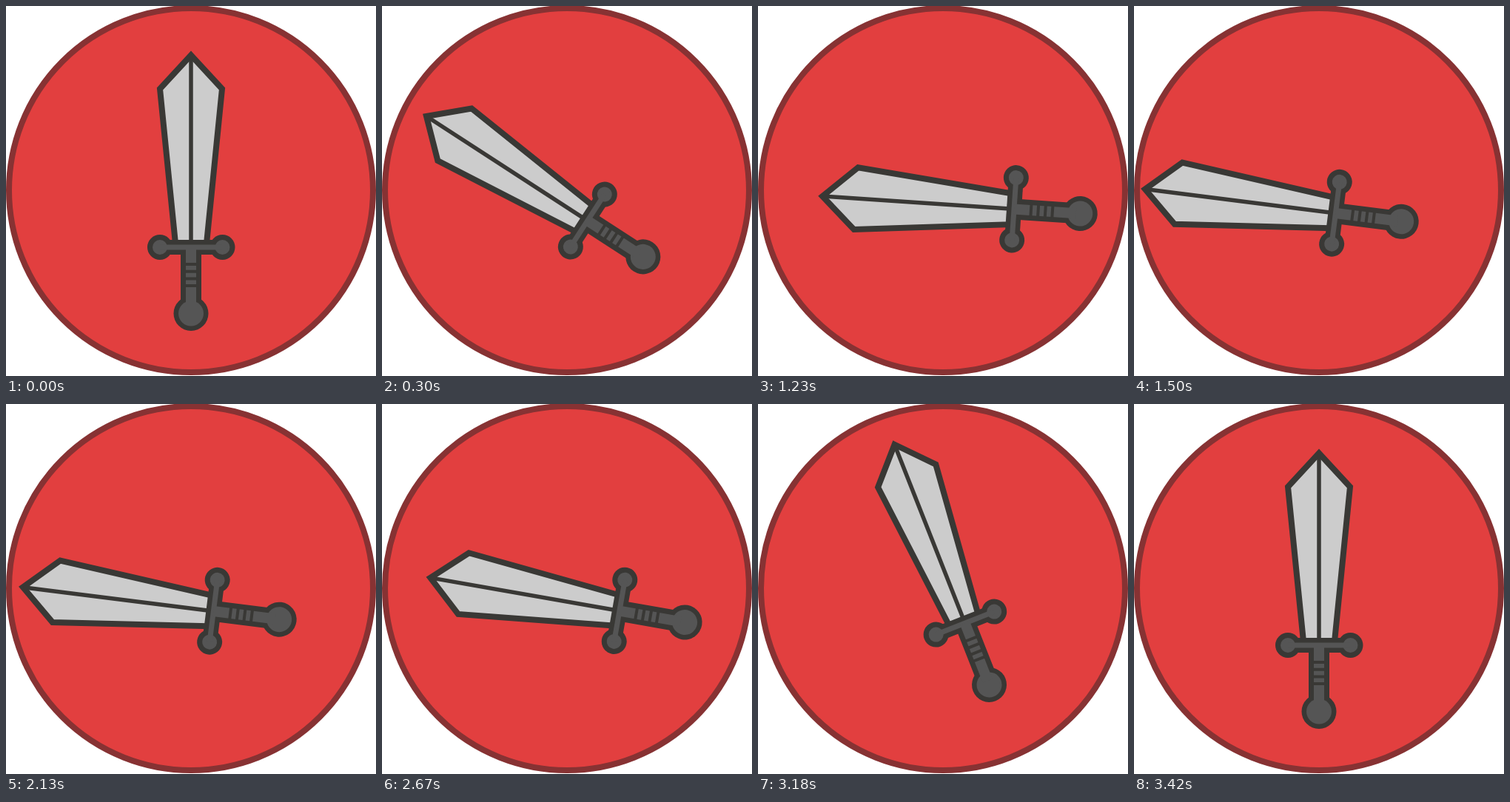
Recreate the animation shown at these times as an HTML page. Size 500x500 px, loop 3780 ms.

```html
<!DOCTYPE html>
<html lang="en">
<head>
<meta charset="utf-8">
<title>Sword</title>
<style>
  html, body { margin: 0; width: 100%; height: 100%; overflow: hidden; background: #fff; }
  svg { display: block; width: 100%; height: 100%; }
  .dark { fill: #393835; }
  .grip { fill: #555; }
  .line { fill: none; stroke: #393835; }
</style>
</head>
<body>
<svg viewBox="0 0 500 500">
  <circle cx="250" cy="249" r="246" fill="#e23f3f" stroke="#873233" stroke-width="8"/>
  <g id="sword">
    <path d="M250 66.5 292 112 271 321H229L208 112Z" fill="#ccc" stroke="#393835" stroke-width="8"/>
    <path class="line" d="M250 67V320" stroke-width="5.5"/>
    <g class="dark">
      <circle cx="208" cy="326" r="17"/>
      <circle cx="292.5" cy="326" r="17"/>
      <circle cx="250" cy="415.5" r="23.5"/>
      <rect x="208" y="316" width="84" height="20"/>
      <rect x="236" y="326" width="28" height="80"/>
    </g>
    <g class="grip">
      <circle cx="208" cy="326" r="10"/>
      <circle cx="292.5" cy="326" r="10"/>
      <circle cx="250" cy="415.5" r="17"/>
      <rect x="208" y="322.5" width="84" height="7"/>
      <rect x="243" y="326" width="14" height="84"/>
    </g>
    <path class="line" d="M242 349h16M242 358.7h16M242 368.4h16M242 378h16" stroke-width="4"/>
  </g>
</svg>
<script>
const LOOP = 3780, STEP = 30;
const sword = document.getElementById('sword');

// start, end, ease handle, angles, then the four curve points for x and y
const moves = [
  { from: 0,    to: 444,  ease: 1 / 6, turn: [0, 80.5],    x: [250, 211.8, 203.6, 225.3], y: [250, 222, 241, 272] },
  { from: 444,  to: 1350, ease: 0,     turn: [80.5, 87],   x: [225.3, 242.5, 259.8, 277], y: [272, 266.7, 266.3, 271] },
  { from: 1350, to: 1500, ease: 1 / 3, turn: [87, 82.8],   x: [277, 250, 224, 197],       y: [271, 271, 270.5, 270.5] },
  { from: 2100, to: 2220, ease: 1 / 3, turn: [82.8, 83],   x: [197, 214, 231, 248],       y: [270.5, 270.5, 270.5, 270.5] },
  { from: 2610, to: 3420, ease: 1 / 6, turn: [83, 0],      x: [248, 228, 262, 250],       y: [270.5, 232, 198, 250] }
];

function bezier([a, b, c, d], s) {
  const r = 1 - s;
  return r * r * r * a + 3 * r * r * s * b + 3 * r * s * s * c + s * s * s * d;
}

// Ease in and out with handles of length k; 0 is linear.
function ease(p, k) {
  let lo = 0, hi = 1;
  for (let i = 0; i < 30; i++) {
    const mid = (lo + hi) / 2;
    if (bezier([0, k, 1 - k, 1], mid) < p) lo = mid; else hi = mid;
  }
  return bezier([0, 0, 1, 1], hi);
}

function draw(now) {
  const t = Math.floor((now % LOOP) / STEP) * STEP;
  const move = moves.findLast(m => t >= m.from);
  const p = Math.min(1, (t - move.from) / (move.to - move.from));
  const s = p === 0 || p === 1 ? p : ease(p, move.ease);
  const [a, b] = move.turn;
  const x = bezier(move.x, s), y = bezier(move.y, s), angle = a + (b - a) * s;
  sword.setAttribute('transform', `translate(${x} ${y}) rotate(${-angle}) translate(-250 -250)`);
}

const start = performance.now();
function tick() {
  draw(performance.now() - start);
  requestAnimationFrame(tick);
}
tick();
</script>
</body>
</html>
```
